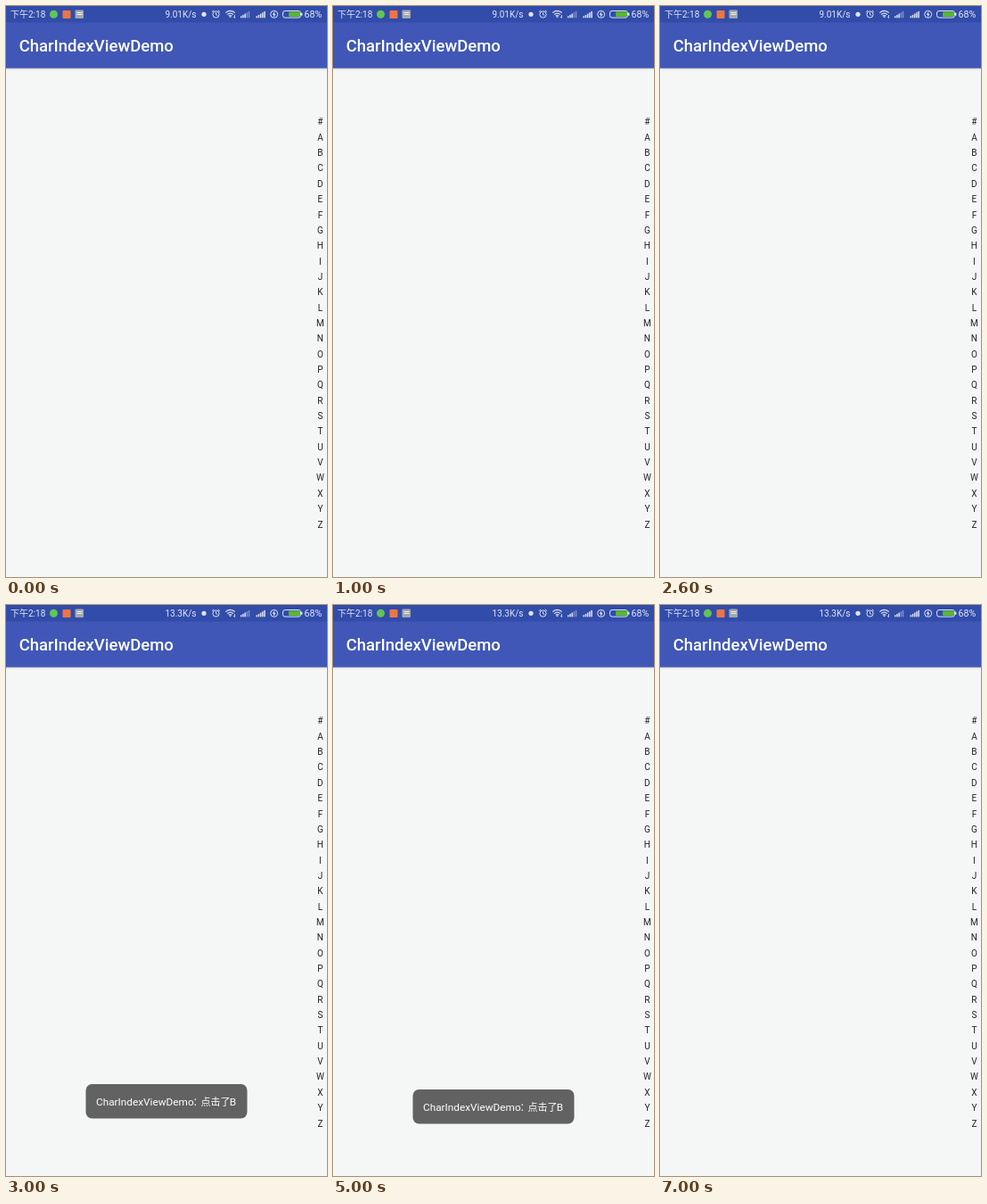
Write an HTML page that moves like this. It is 360 px wide and 640 px high and loops after 8 s.

```html
<!DOCTYPE html>
<html lang="zh">
<head>
<meta charset="utf-8">
<style>
html, body { margin: 0; width: 100%; height: 100%; overflow: hidden; background: #f5f6f6; }
svg { display: block; width: 100%; height: 100%; }
text { font-family: Roboto, "Noto Sans CJK SC", "Noto Sans CJK", sans-serif; }
.status { font-size: 10px; fill: #e4e8f6; }
.line { fill: none; stroke: #dfe4f5; stroke-width: 1; }
.solid { fill: #dfe4f5; }
#index { font-size: 10px; fill: #222; text-anchor: middle; }
#toast text { font-size: 11.8px; fill: #fff; }
#toast .cjk { font-size: 11px; }
</style>
</head>
<body>
<svg viewBox="0 0 360 640">
  <defs>
    <linearGradient id="shade" x2="0" y2="1">
      <stop stop-color="#000" stop-opacity=".2"/>
      <stop offset="1" stop-color="#000" stop-opacity="0"/>
    </linearGradient>
  </defs>
  <rect width="360" height="640" fill="#f5f6f6"/>
  <rect y="69" width="360" height="3" fill="url(#shade)"/>
  <rect width="360" height="69.7" fill="#4057b7"/>
  <rect width="360" height="18.5" fill="#324ca9"/>
  <text x="14.7" y="51.2" font-size="18.5" font-weight="500" fill="#fff">CharIndexViewDemo</text>

  <g class="status">
    <text x="5" y="13">下午2:18</text>
    <text id="speed" x="213.5" y="13" text-anchor="end"></text>
    <text x="334.6" y="13" font-size="10.6">68%</text>
  </g>
  <circle cx="53.5" cy="9.3" r="4.5" fill="#62c554"/>
  <rect x="63.5" y="5" width="9" height="9" rx="1" fill="#ee7544"/>
  <rect x="77.5" y="4.5" width="9.5" height="9.5" rx="1" fill="#a3a7ac"/>
  <path d="M79.5 7.5h6M79.5 9.5h6" stroke="#eef0f2"/>
  <circle class="solid" cx="222" cy="9.3" r="2.6"/>

  <g class="line">
    <circle cx="235.5" cy="9.5" r="3.6"/>
    <path d="M235.5 7.3v2.4l1.8 .8M231.2 6.6l2-1.8M239.8 6.6l-2-1.8"/>
    <path d="M246.3 7.6q5.2-4.4 10.4 0M248 9.6q3.5-2.9 7 0M249.7 11.3q1.8-1.4 3.6 0" stroke-width="1.2"/>
    <path d="M256.5 10v3.5M255 12l1.5 1.5" stroke-width=".8"/>
    <circle cx="300.7" cy="9.3" r="4"/>
    <rect x="310.5" y="5.5" width="20" height="7.6" rx="2.5"/>
  </g>
  <path class="solid" d="M301.5 5.8l-2.8 4h1.6l-.5 3.3 2.8-4.2h-1.6zM331 7.8h1.4v3h-1.4zM251.5 11.4l1.2 1.7h-2.4z"/>
  <rect x="317" y="6.5" width="13" height="5.6" rx="1" fill="#58b72f"/>
  <g class="solid" id="bars"></g>

  <g id="index"></g>

  <g id="toast">
    <rect x="89.5" y="537" width="181" height="38.5" rx="7" fill="#626262"/>
    <text x="101" y="560.5">CharIndexViewDemo</text>
    <text class="cjk" x="209.5" y="560.5">：</text>
    <text class="cjk" x="218.5" y="560.5">点击了</text>
    <text x="250.8" y="560.5">B</text>
  </g>
</svg>
<script>
const $ = id => document.getElementById(id);

$("index").innerHTML = [..."#ABCDEFGHIJKLMNOPQRSTUVWXYZ"]
  .map((c, i) => `<text x="352.4" y="${133.4 + i * 17.35}">${c}</text>`).join("");

// Two signal meters; the first one has weak upper bars.
const meter = (x, strong) => [0, 1, 2, 3, 4].map(i => {
  const h = 2 + i * 1.35;
  return `<rect x="${x + i * 2.2}" y="${13.3 - h}" width="1.5" height="${h}" opacity="${i < strong ? 1 : .45}"/>`;
}).join("");
$("bars").innerHTML = meter(263, 3) + meter(280.5, 5);

function draw(now) {
  const t = now % 8000;
  $("speed").textContent = t < 3000 ? "9.01K/s" : "13.3K/s";
  $("toast").style.display = t >= 3000 && t < 7000 ? "" : "none";
  $("toast").setAttribute("transform", `translate(0 ${t < 4000 ? 0 : 6})`);
  requestAnimationFrame(draw);
}
draw(performance.now());
</script>
</body>
</html>
```
